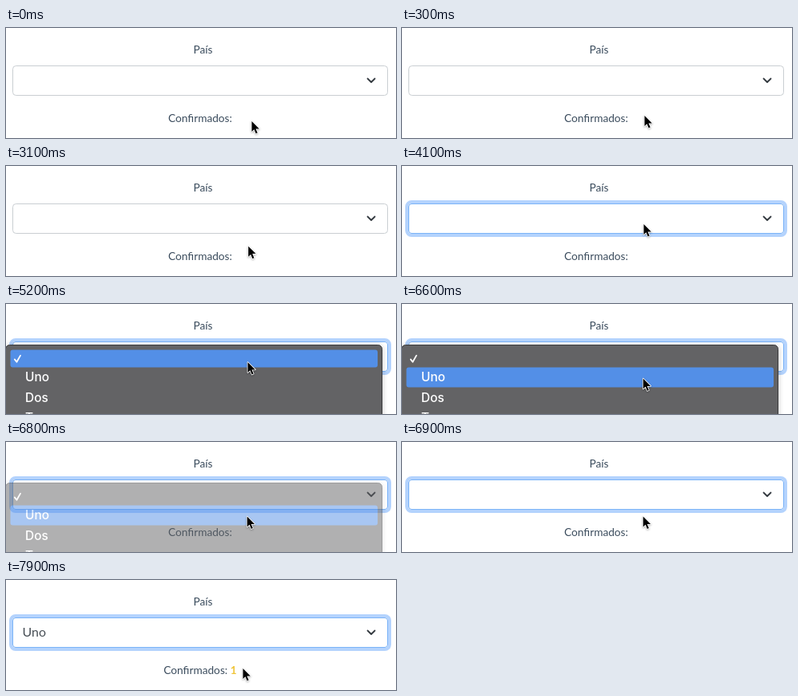
These frames come from a looping animation (488 px wide and 138 px high, 8 s). An HTML page:

```html
<!DOCTYPE html>
<html lang="es">
<head>
<meta charset="utf-8">
<title>País</title>
<style>
  html, body { margin: 0; width: 100%; height: 100%; overflow: hidden; background: #fff; }
  svg { display: block; width: 488px; height: 138px; }
  text { font: 13.7px Lato, sans-serif; fill: #3b4c5d; }
  .mid { text-anchor: middle; }
  .count { font-weight: 700; fill: #f0c53a; }
  .value { font-size: 16px; fill: #495057; }
  .menu text { font: 500 15.5px Inter, sans-serif; fill: #fff; }
  .menu .panel { fill: #636365; stroke: #3c3c3e; filter: drop-shadow(0 1px 3px rgba(0, 0, 0, .25)); }
  .line { fill: none; stroke-width: 1.8; stroke-linecap: round; stroke-linejoin: round; }
  .arrow { fill: #000; stroke: #fff; stroke-width: 1.6; stroke-linejoin: round; paint-order: stroke;
    filter: drop-shadow(0 1px 1px rgba(0, 0, 0, .3)); }
</style>
</head>
<body>
<svg viewBox="0 0 488 138">
  <text class="mid" x="246.5" y="32">País</text>

  <rect x="8.5" y="47.5" width="469" height="37" rx="4" fill="#fff" stroke="#c9ced2"/>
  <g id="focus">
    <rect x="6" y="45" width="474" height="42" rx="6" fill="none" stroke="#b4d3fd" stroke-width="4"/>
    <rect x="8.5" y="47.5" width="469" height="37" rx="3.5" fill="#fff" stroke="#7ab3f8"/>
  </g>
  <path class="line" d="M452.5 63.5l4.5 4.5 4.5-4.5" stroke="#343a40"/>
  <text id="value" class="value" x="20.5" y="71">Uno</text>

  <text id="empty" class="mid" x="243" y="118">Confirmados:</text>
  <text id="filled" class="mid" x="243" y="118">Confirmados: <tspan class="count">1</tspan></text>

  <g id="menu" class="menu">
    <rect class="panel" x="-.5" y="51.5" width="471" height="110" rx="5"/>
    <rect id="mark" x="5.5" width="459.5" rx="3" fill="#538fe7"/>
    <path class="line" d="M10.8 69.4l2.6 3.4 4.6-8.2" stroke="#fff"/>
    <text x="24" y="97">Uno</text>
    <text x="24" y="123">Dos</text>
    <text x="24" y="148">Tres</text>
  </g>

  <g id="cursor">
    <path class="arrow" d="M0 0V13L3 10.2 5.2 15.5 7.2 14.6 5 9.4H9.4z"/>
  </g>
</svg>
<script>
  const LOOP = 8000, STEP = 100;
  const el = id => document.getElementById(id);
  const show = (id, amount) => { el(id).style.opacity = amount; };

  // Progress from 0 to 1 between two times.
  const ramp = (t, from, to) => Math.min(1, Math.max(0, (t - from) / (to - from)));
  const ease = p => 1 - (1 - p) ** 1.3;

  const home = { x: 307.5, y: 117 };
  const moves = [
    { from: 200, to: 300, x: 303.5, y: 110 },
    { from: 3000, to: 3500, x: 302.5, y: 73 },
    { from: 5600, to: 6000, x: 301.7, y: 93.5 },
    { from: 7300, to: 7500, x: 295.7, y: 101 },
    { from: 7600, to: 7900, x: 296.5, y: 111 }
  ];

  function cursorAt(t) {
    let { x, y } = home;
    for (const m of moves) {
      const p = ease(ramp(t, m.from, m.to));
      x += (m.x - x) * p;
      y += (m.y - y) * p;
    }
    return `translate(${x} ${y})`;
  }

  function draw(time) {
    const t = time - time % STEP;
    const hover = t >= 5700, chosen = t >= 7000;
    el('cursor').setAttribute('transform', cursorAt(t));
    el('mark').setAttribute('y', hover ? 79.5 : 57.5);
    el('mark').setAttribute('height', hover ? 25 : 22);
    show('focus', ramp(t, 3800, 4100));
    show('menu', t < 5000 ? 0 : 1 - ramp(t, 6700, 6900));
    show('value', +chosen);
    show('filled', +chosen);
    show('empty', +!chosen);
  }

  let start;
  function tick(now) {
    start ??= now;
    draw((now - start) % LOOP);
    requestAnimationFrame(tick);
  }
  draw(0);
  requestAnimationFrame(tick);
</script>
</body>
</html>
```
